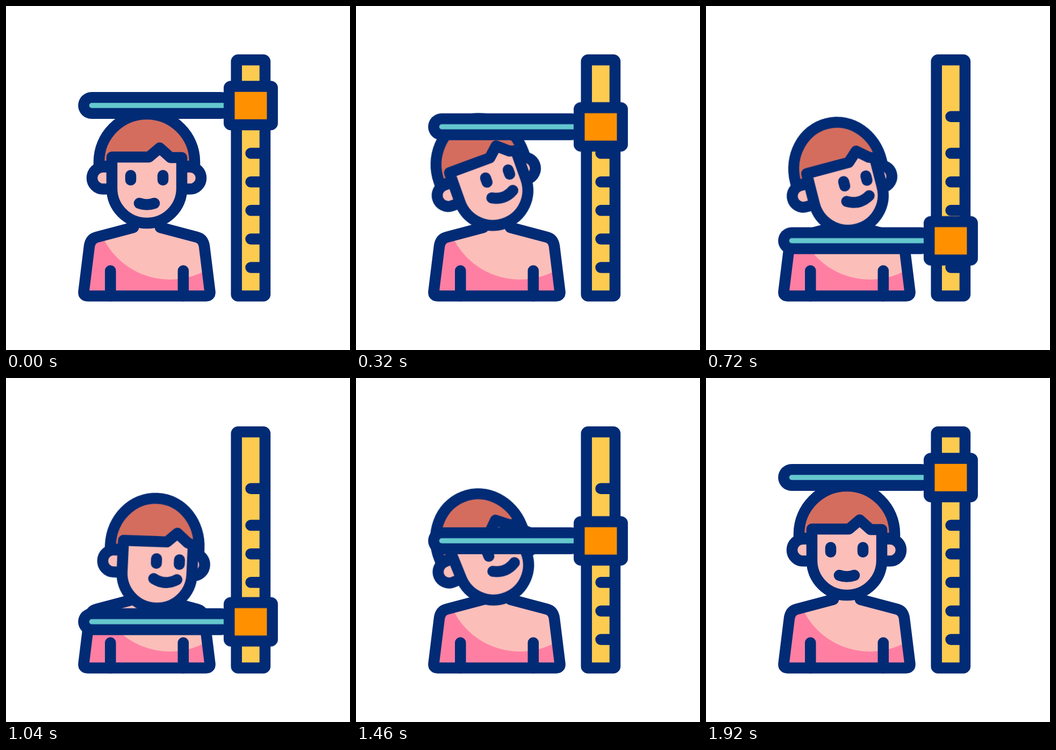
Write an HTML page without scripts that moves like this. It is 640 by 640 pixels and loops after 2400 ms.

```html
<!DOCTYPE html>
<html lang="en">
<head>
<meta charset="utf-8">
<title>Height check</title>
<style>
  html, body { margin: 0; width: 100%; height: 100%; overflow: hidden; background: #fff; }
  svg { display: block; width: 100%; height: 100%; }

  :root { --navy: #022b75; --skin: #fcbeb9; --ease: cubic-bezier(.66, 0, .34, 1); }

  .ink { stroke: var(--navy); stroke-width: 20.5; stroke-linecap: round; stroke-linejoin: round; }
  .line { fill: none; }
  .skin { fill: var(--skin); }
  .hair { fill: #d46d5e; }

  .slider, .tilt, .turn, .drop, .hair, .face, .ear, .eye-l, .eye-r, .mouth {
    animation: 2400ms var(--ease) infinite;
  }

  .slider { animation-name: slide; }
  @keyframes slide {
    0%, 80%, 100% { transform: translateY(0); }
    40% { transform: translateY(270px); }
  }

  /* the head swings around the left end of the neck */
  .tilt { transform-origin: 236px 412px; animation-name: tilt; }
  @keyframes tilt {
    0%, 80%, 100% { transform: rotate(0deg); }
    19.17%, 20% { transform: rotate(-22deg); }
    43.33% { transform: rotate(2.7deg); }
    60.83% { transform: rotate(-22deg); }
  }

  .turn { animation-name: turn; }
  @keyframes turn {
    0%, 80%, 100% { transform: translateX(0); }
    19.17%, 60.83% { transform: translateX(16.5px); }
  }

  .drop { animation-name: drop; }
  @keyframes drop {
    0%, 80%, 100% { transform: translateY(0); }
    24.17%, 55.83% { transform: translateY(22px); }
  }

  /* features shift while the head looks to the side */
  .hair { animation-name: hair; }
  @keyframes hair {
    0%, 80%, 100% { d: path("M173 298V290C173 241 213 201 262 201C311 201 351 241 351 290V298Z"); }
    19.17%, 60.83% { d: path("M173 298V290C173 241 210 200 256 200C305 200 338 243 338 290V298Z"); }
  }

  .face { animation-name: face; }
  @keyframes face {
    0%, 80%, 100% { d: path("M197 281L266 281L286 264L306 282L327 282L327 339C327 375 298 404 262 404C226 404 197 375 197 339Z"); }
    19.17%, 60.83% { d: path("M197 281L278 280L296.5 263L316.5 280L327 284L327 339C327 375 298 404 262 404C226 404 197 375 197 339Z"); }
  }

  .mouth { animation-name: mouth; }
  @keyframes mouth {
    0%, 80%, 100% { d: path("M248 367Q262 372 276 367"); }
    19.17%, 60.83% { d: path("M256.5 349.5Q278 362 299.5 349.5"); }
  }

  .ear { animation-name: ear; }
  @keyframes ear {
    0%, 80%, 100% { transform: translateX(0); }
    19.17%, 60.83% { transform: translateX(-13px); }
  }

  .eye-l { animation-name: eye-l; }
  @keyframes eye-l {
    0%, 80%, 100% { transform: translate(0, 0); }
    19.17%, 60.83% { transform: translate(28px, -3px); }
  }

  .eye-r { animation-name: eye-r; }
  @keyframes eye-r {
    0%, 80%, 100% { transform: translate(0, 0); }
    19.17%, 60.83% { transform: translate(10.7px, -3px); }
  }
</style>
</head>
<body>
<svg viewBox="0 0 640 640">
  <defs>
    <path id="torso" d="M237 412L169 430Q157 433 155 447L144.5 532Q144 539.5 152 539.5H372Q380 539.5 379.5 532L369 447Q367 433 355 430L287 412"/>
    <clipPath id="torso-clip"><use href="#torso"/></clipPath>
  </defs>

  <g class="ruler">
    <rect class="ink" x="428.7" y="100.3" width="53.2" height="439.2" rx="3" fill="#fdcb50"/>
    <path class="ink line" d="M455.5 205.7H480M455.5 274H480M455.5 327.2H480M455.5 380.3H480M455.5 433.4H480M455.5 486.5H480"/>
  </g>

  <g class="body">
    <g clip-path="url(#torso-clip)">
      <rect x="130" y="400" width="264" height="150" fill="#ff7fa3"/>
      <circle class="skin" cx="305" cy="370.4" r="138.6"/>
    </g>
    <use href="#torso" class="ink line"/>
    <path class="ink line" d="M194.3 492.5V539.5M329.8 492.5V539.5"/>
  </g>

  <g class="tilt"><g class="turn"><g class="drop">
    <path class="ink skin" d="M200 340.5H180.5A20 20 0 0 1 180.5 299.5H200Z"/>
    <path class="ink skin ear" d="M322 340.5H342.5A20 20 0 0 0 342.5 299.5H322Z"/>
    <path class="ink hair" d="M173 298V290C173 241 213 201 262 201C311 201 351 241 351 290V298Z"/>
    <path class="ink skin face" d="M197 281L266 281L286 264L306 282L327 282L327 339C327 375 298 404 262 404C226 404 197 375 197 339Z"/>
    <path class="ink line eye-l" d="M232 315.3V323.7"/>
    <path class="ink line eye-r" d="M292 315.3V323.7"/>
    <path class="ink line mouth" d="M248 367Q262 372 276 367"/>
  </g></g></g>

  <g class="slider">
    <path class="ink line" style="stroke-width: 50" d="M159.2 185H400"/>
    <path d="M159.5 185H410" fill="none" stroke="#65c8ce" stroke-width="9.5" stroke-linecap="round"/>
    <rect class="ink" x="415.2" y="149.4" width="80.4" height="71.6" rx="3" fill="#ff9100"/>
  </g>
</svg>
</body>
</html>
```
